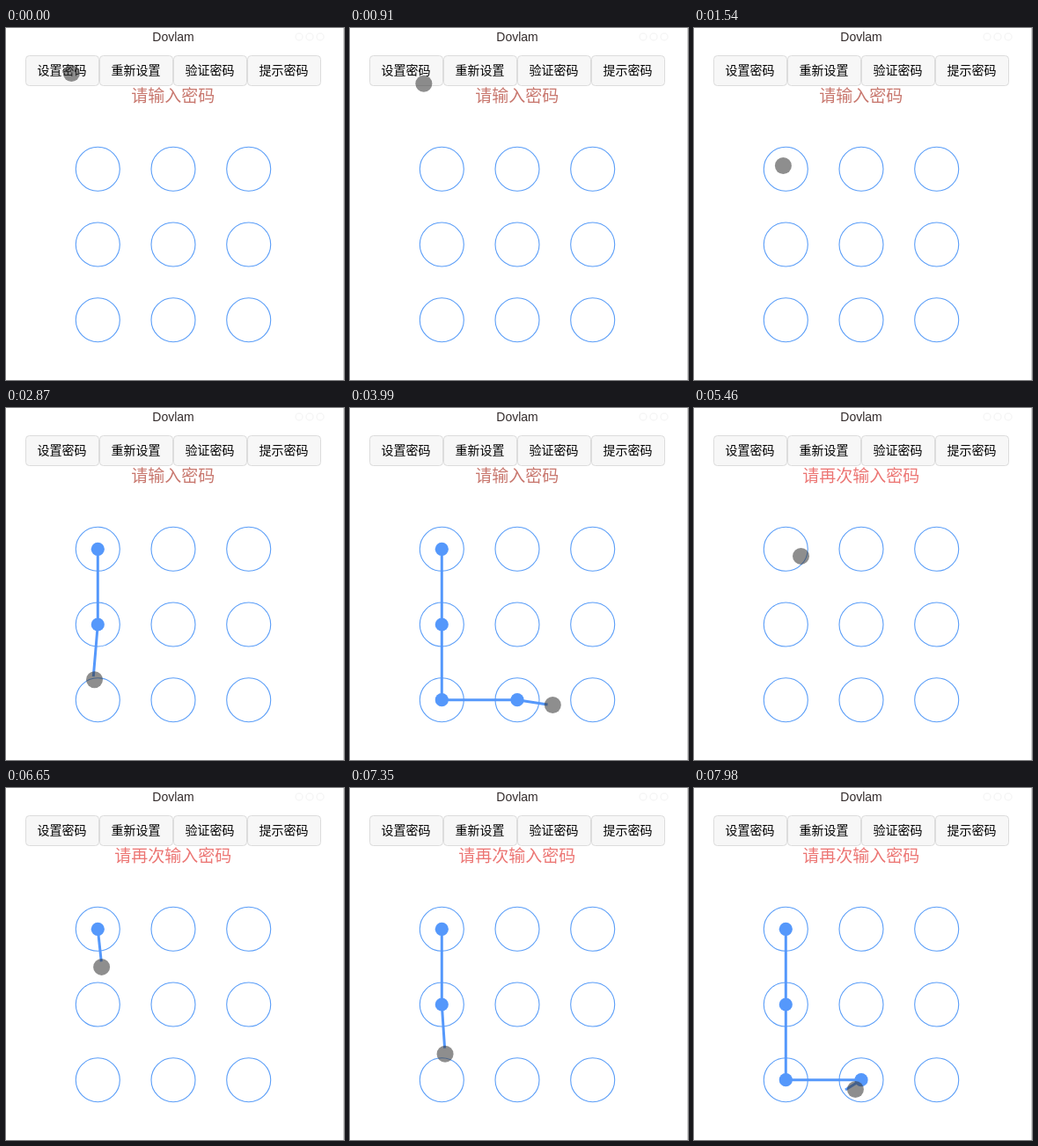
An HTML page that plays this animation: 384 by 400 pixels, repeating every 8000 ms.

```html
<!DOCTYPE html>
<html lang="zh-CN">
<head>
<meta charset="utf-8">
<title>Pattern lock</title>
<style>
html, body { margin: 0; width: 100%; height: 100%; overflow: hidden; background: #fff; }
svg { display: block; }
text { text-anchor: middle; font-family: "Noto Sans CJK SC", "Noto Sans CJK", sans-serif; }
#title { font: 14px "Liberation Sans", Arial, sans-serif; fill: #332b2b; }
#hint { font-size: 19px; font-weight: 300; }
#buttons rect { fill: #f7f7f7; stroke: #dcdcdc; }
#buttons text { font-size: 14px; }
#menu { fill: none; stroke: #f6f6f6; stroke-width: 1.5; }
#rings { fill: none; stroke: #5b9ef8; stroke-width: 1.1; }
#dots { fill: #5598fb; }
#line { fill: none; stroke: #5598fb; stroke-width: 3; }
</style>
</head>
<body>
<svg width="384" height="400" viewBox="0 0 384 400">
  <text id="title" x="190" y="15">Dovlam</text>
  <g id="menu"></g>
  <path d="M383.5 0V400" stroke="#ccc"/>
  <g id="buttons"></g>
  <text id="hint" x="189.8" y="84"></text>
  <g id="rings"></g>
  <polyline id="line"/>
  <g id="dots"></g>
  <circle id="cursor" r="9.5" transform="translate(.4 .5)" fill="#383838" fill-opacity=".57"/>
</svg>
<script>
const LOOP = 8000, STEP = 70, LAG = 45, REACH = 25;
const FIRST = 1960, RELEASE = 4690, CLEAR = 4970, SECOND = 6160;
const $ = id => document.getElementById(id);
const circles = (points, r) =>
  points.map(([x, y]) => `<circle cx="${x}" cy="${y}" r="${r}"/>`).join("");

const rows = [0, 1, 2];
const grid = rows.flatMap(r => rows.map(c => [104.3 + 85.7 * c, 160.3 + 85.7 * r]));

// Pointer moves: each is a quadratic curve from where the last one ended
const home = [74, 51];
const moves = [
  { from: 840, to: 1540, bend: [125, 110], end: [101, 156] },
  { from: 1890, to: 2730, end: [99, 298] },
  { from: 2730, to: 3570, bend: [96, 331], end: [169, 336] },
  { from: 3570, to: 4550, bend: [254, 337], end: [274, 339] },
  { from: 4900, to: 5740, bend: [98, 139], end: [106, 154] },
  { from: 6090, to: 6930, bend: [110, 173], end: [107, 245] },
  { from: 6930, to: 7560, end: [108, 330] },
  { from: 7560, to: 7980, bend: [130, 348], end: [183, 342] }
];

function pointer(t) {
  let start = home;
  for (const { from, to, bend, end } of moves) {
    if (t <= from) break;
    const u = Math.min(1, (t - from) / (to - from)), v = 1 - u;
    const at = start.map((a, i) => {
      const b = bend ? bend[i] : (a + end[i]) / 2;
      return v * v * a + 2 * u * v * b + u * u * end[i];
    });
    if (u < 1) return at;
    start = end;
  }
  return start;
}

// Dots collected by a touch that began at start
function collect(start, t) {
  const hit = [];
  for (let s = start; s <= t; s += STEP) {
    const [x, y] = pointer(s - LAG);
    const dot = grid.find(d => Math.abs(d[0] - x) < REACH && Math.abs(d[1] - y) < REACH);
    if (dot && !hit.includes(dot)) hit.push(dot);
  }
  return hit;
}

$("menu").innerHTML = circles(rows.map(i => [333 + 12 * i, 10]), 4);
$("rings").innerHTML = circles(grid, 25);
$("buttons").innerHTML = ["设置密码", "重新设置", "验证密码", "提示密码"].map((label, i) =>
  `<rect x="${22.5 + 84 * i}" y="31.5" width="83" height="34" rx="4"/>
   <text x="${63.4 + 84 * i}" y="53">${label}</text>`).join("");
const firstButton = $("buttons").querySelector("rect");

function draw(t) {
  firstButton.style.fill = t >= 280 && t < 700 ? "#e2e2e2" : "";
  const again = t >= RELEASE;
  $("hint").textContent = again ? "请再次输入密码" : "请输入密码";
  $("hint").style.fill = again ? "#ec7674" : "#c8776e";

  let hit = [];
  if (t >= SECOND) hit = collect(SECOND, t);
  else if (t >= FIRST && t < CLEAR) hit = collect(FIRST, t);
  const touching = hit.length && (t < RELEASE || t >= SECOND);
  $("dots").innerHTML = circles(hit, 7.6);
  $("line").setAttribute("points", (touching ? [...hit, pointer(t - LAG)] : hit).join(" "));

  const [x, y] = pointer(t);
  $("cursor").setAttribute("cx", x);
  $("cursor").setAttribute("cy", y);
}

const begin = performance.now();
function tick() {
  const t = (performance.now() - begin) % LOOP;
  draw(Math.floor(t / STEP) * STEP);
  requestAnimationFrame(tick);
}
tick();
</script>
</body>
</html>
```
